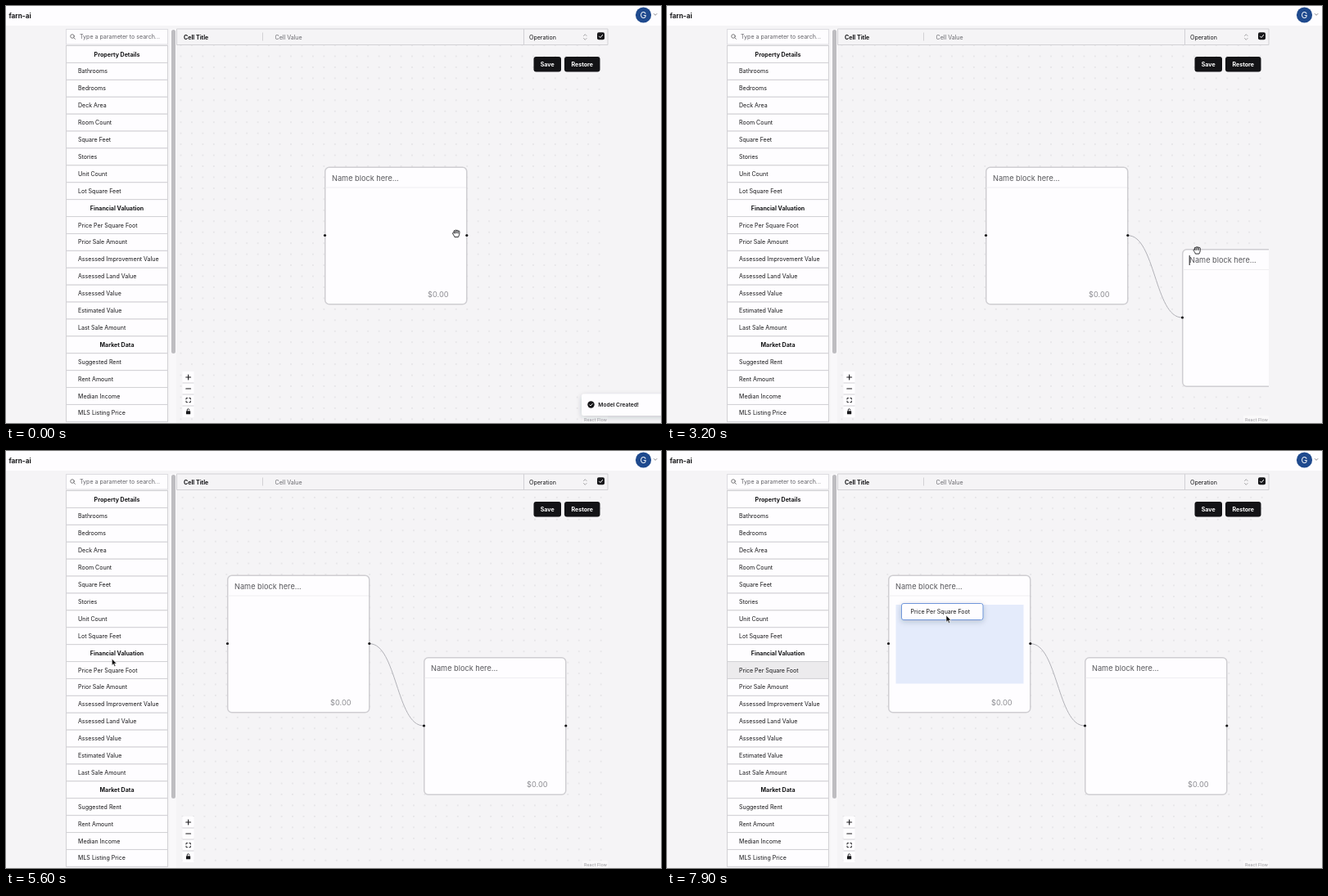
An HTML page for the animation above (8000 ms loop, 800 by 510 pixels).

```html
<!DOCTYPE html>
<html lang="en">
<head>
<meta charset="utf-8">
<title>Block editor</title>
<style>
html, body { margin: 0; width: 100%; height: 100%; overflow: hidden; background: #f5f4f6; }
svg { display: block; }
text { font-family: Inter, "Open Sans", sans-serif; font-size: 7.07px; fill: #161618; white-space: pre; }
.b { font-weight: 700; }
.sheet { fill: #fefdff; }
.line { fill: none; stroke: #d2d1d5; }
.ink { fill: none; stroke: #18181b; stroke-linecap: round; stroke-linejoin: round; }
.edge { fill: none; stroke: #b1b1b7; }
</style>
</head>
<body>
<svg width="800" height="510" viewBox="0 0 800 510">
  <defs>
    <clipPath id="pane"><rect x="208" y="48" width="527" height="462"/></clipPath>
    <pattern id="dots" width="13.45" height="13.45" patternUnits="userSpaceOnUse">
      <circle cx="6.7" cy="6.7" r=".6" fill="#c6c5ca"/>
    </pattern>
    <filter id="soft" x="-20%" y="-40%" width="140%" height="200%">
      <feDropShadow dx="0" dy="2" stdDeviation="3" flood-color="#234" flood-opacity=".22"/>
    </filter>
    <g id="block">
      <rect class="sheet" x=".75" y=".75" width="173" height="167.5" rx="5" stroke="#cfced2" stroke-width="1.5"/>
      <path d="M1.5 25.5H173" stroke="#efeef1"/>
      <text x="9" y="17" style="font-size:9.2px;fill:#58585c">Name block here...</text>
      <text x="151.5" y="159.3" text-anchor="end" style="font-size:9.2px;fill:#8b8b90">$0.00</text>
      <circle cx=".5" cy="84" r="1.6" fill="#161618"/>
      <circle cx="173.8" cy="84" r="1.6" fill="#161618"/>
    </g>
  </defs>

  <g clip-path="url(#pane)">
    <rect id="grid" x="150" y="0" width="800" height="660" fill="url(#dots)"/>
    <g id="world">
      <path id="edge" class="edge"/>
      <use href="#block" x="389" y="196.5"/>
      <rect id="zone" x="398.5" y="233" width="156" height="96.5" fill="#e4ebfb"/>
      <g id="second">
        <use href="#block" x="629" y="297"/>
        <path id="caret" d="M638.2 305v12" stroke="#161618"/>
      </g>
    </g>
    <rect x="704" y="501" width="31" height="9" fill="#fff" opacity=".5"/>
    <text x="706" y="508" style="font-size:5.4px;fill:#98979c">React Flow</text>
  </g>

  <g id="toolbar">
    <path class="line" d="M208.5 28V47.5H735V28ZM632.5 28V47.5" stroke="#dddce0"/>
    <path class="line" d="M313.5 32.5V42.5"/>
    <text class="b" x="217" y="40.5">Cell Title</text>
    <text x="328.5" y="40.5" style="fill:#68686d">Cell Value</text>
    <text x="639" y="40.5">Operation</text>
    <path class="ink" d="M705.5 36.5l1.8-1.8 1.8 1.8M705.5 39.5l1.8 1.8 1.8-1.8" stroke-width=".6" opacity=".6"/>
    <rect x="722" y="32.3" width="9" height="9" rx="2" fill="#18181b"/>
    <path d="M724.2 36.9l1.7 1.7 3-3.5" fill="none" stroke="#fff"/>
    <rect x="644.5" y="62" width="33.5" height="18.5" rx="3" fill="#131316"/>
    <rect x="682" y="62" width="43.5" height="18.5" rx="3" fill="#131316"/>
    <text class="b" x="661.2" y="73.8" text-anchor="middle" style="fill:#fff">Save</text>
    <text class="b" x="703.7" y="73.8" text-anchor="middle" style="fill:#fff">Restore</text>
  </g>

  <g id="controls">
    <rect class="sheet" x="215.5" y="447" width="14" height="56"/>
    <path class="line" d="M215.5 461H229.5M215.5 475H229.5M215.5 489H229.5" stroke="#eeedf0"/>
    <path class="ink" d="M219.8 454h5.8M222.7 451.1v5.8M219.8 468h5.8" stroke-linecap="butt" stroke-width="1.1"/>
    <path class="ink" d="M220 481v-1.5h1.6M223.8 479.5h1.6v1.5M225.4 483.2v1.5h-1.6M221.6 484.7H220v-1.5" stroke-width=".9"/>
    <rect x="220" y="495.3" width="5.2" height="3.9" rx=".5" fill="#18181b"/>
    <path class="ink" d="M221.3 495v-1a1.3 1.3 0 0 1 2.6 0" stroke-width=".9"/>
  </g>

  <g id="sidebar">
    <rect class="sheet" x="73.5" y="28.5" width="124" height="18.5" stroke="#dddce0"/>
    <g class="ink" stroke-width=".8" opacity=".7"><circle cx="81" cy="37" r="2.3"/><path d="M82.8 38.8l1.6 1.6"/></g>
    <text x="90" y="40.3" style="fill:#626267">Type a parameter to search...</text>
    <rect x="200" y="28" width="8" height="482" fill="#f9f8fa"/>
    <rect x="202" y="29" width="5" height="396" rx="2.5" fill="#bebdc1"/>
    <g id="rows"></g>
  </g>

  <g id="topbar">
    <rect class="sheet" width="800" height="24"/>
    <text class="b" x="3.5" y="14.8" style="font-size:8.2px">farn-ai</text>
    <circle cx="778.5" cy="11" r="9.6" fill="#1f4a8e"/>
    <text x="778.5" y="14.9" text-anchor="middle" style="font-size:10.5px;fill:#fff">G</text>
    <path class="ink" d="M791.3 9.5l1.8 1.8 1.8-1.8" stroke-width=".7" opacity=".7"/>
  </g>

  <g id="toast">
    <rect class="sheet" x="703" y="474.5" width="150" height="26.5" rx="3" filter="url(#soft)"/>
    <circle cx="714.5" cy="487.5" r="4.2" fill="#161618"/>
    <path d="M712.6 487.6l1.4 1.4 2.5-2.8" fill="none" stroke="#fff" stroke-width=".9"/>
    <text x="723.3" y="490" style="font-size:6.7px;font-weight:600">Model Created!</text>
  </g>

  <g id="chip">
    <rect class="sheet" x=".5" y=".5" width="99.5" height="20" rx="2.5" stroke="#6f96da" filter="url(#soft)"/>
    <text x="11.5" y="13.1">Price Per Square Foot</text>
  </g>

  <g id="arrow"><path d="M0 0V8.2L1.9 6.5 3.2 9.4 4.6 8.8 3.3 6H5.9Z" fill="#111" stroke="#fff" stroke-width=".6"/></g>
  <g id="hand" class="ink" stroke-width=".9">
    <path d="M-2.2 4.2C-2.6 2.6-4.2 1.4-4.4 0c0-1 1-1 1.6-.2L-3.2-2.4c0-1.1 1.3-1.2 1.6-.2C-1.6-4.3.2-4.4.3-3 .6-4.2 2-4 2.1-2.6 2.5-3.4 3.9-3.2 3.9-2 4 .6 3.6 2.2 2.6 4.2Z" fill="#fff"/>
    <path d="M-1.5-2.4V0M.3-2.9V-.2M2.1-2.4V0"/>
  </g>
  <g id="fist" class="ink" stroke-width=".9">
    <path d="M-1.9 3.6C-2.4 2.4-3.8 1.8-3.8.4-3.9-.6-3-1-2.8-.8-3.1-2.6-1.6-2.9-1.2-2.3-.9-3.3.6-3.2.8-2.3 1.3-3 2.4-2.7 2.5-1.9 4.3-2 3.9.9 2.8 3.6Z" fill="#fff"/>
    <path d="M-2.8-.8V.6M-1.2-2v1M.8-2v1M2.5-1.7v.8"/>
  </g>
</svg>

<script>
const $ = id => document.getElementById(id);
const LOOP = 8000, STEP = 100, PITCH = 20.9;
const HOME = { x: 76.5, y: 257.5 };

// Section titles start with "#".
const labels = ["#Property Details", "Bathrooms", "Bedrooms", "Deck Area", "Room Count", "Square Feet",
  "Stories", "Unit Count", "Lot Square Feet", "#Financial Valuation", "Price Per Square Foot",
  "Prior Sale Amount", "Assessed Improvement Value", "Assessed Land Value", "Assessed Value",
  "Estimated Value", "Last Sale Amount", "#Market Data", "Suggested Rent", "Rent Amount",
  "Median Income", "MLS Listing Price"];
const PRICE = 10;

function add(parent, tag, attrs, text) {
  const el = document.createElementNS("http://www.w3.org/2000/svg", tag);
  for (const k in attrs) el.setAttribute(k, attrs[k]);
  if (text) el.textContent = text;
  parent.append(el);
  return el;
}

const rows = labels.map((label, i) => {
  const y = 59 + i * PITCH, title = label[0] === "#";
  const box = add($("rows"), "rect", { class: "sheet", x: 73.5, y: y - PITCH / 2, width: 124, height: PITCH, stroke: "#d2d1d5" });
  add($("rows"), "text", title
    ? { class: "b", x: 135.5, y: y + 2.5, "text-anchor": "middle" }
    : { x: 88, y: y + 2.5 }, label.replace("#", ""));
  return { box, title };
});

// Pointer path: time, x, y.
const path = [
  [0, 550, 278], [200, 556, 277], [400, 556, 277], [1100, 565, 281], [1400, 565, 281],
  [1500, 575, 282], [1700, 610, 292], [1900, 628, 297], [2400, 628, 297], [2700, 645, 299],
  [2800, 645, 299], [3000, 646, 300], [3100, 646, 300], [3300, 649, 297], [3400, 649, 297],
  [3500, 643, 296], [3700, 595, 285], [3800, 577, 279], [4000, 549, 263], [4200, 530, 252],
  [4300, 530, 252], [4400, 500, 245], [4600, 230, 208], [4800, 135, 205], [4900, 135, 205],
  [5700, 128.5, 261], [5900, 128.5, 261], [6000, 132, 260], [6300, 304, 193], [6500, 310, 194],
  [6800, 250, 238], [7100, 133, 270], [7200, 129, 271], [7300, 129, 271], [7400, 180, 252],
  [7600, 285, 214], [7900, 341, 201]];

function pointer(t) {
  const i = path.findIndex(k => k[0] >= t);
  if (i < 1) return { x: path[0][1], y: path[0][2] };
  const [a, b] = [path[i - 1], path[i]], f = (t - a[0]) / (b[0] - a[0]);
  return { x: a[1] + (b[1] - a[1]) * f, y: a[2] + (b[2] - a[2]) * f };
}

const show = (id, on) => $(id).style.display = on ? "" : "none";
const move = (id, x, y) => $(id).setAttribute("transform", `translate(${x} ${y})`);

function curve(x1, y1, x2, y2) {
  const m = (x1 + x2) / 2;
  return `M${x1} ${y1}C${m} ${y1} ${m} ${y2} ${x2} ${y2}`;
}

// Offset of the dragged chip from its row, or null when nothing is dragged.
function drag(t) {
  const first = t < 7400;
  if (t < 6000 || (first && t > 6800)) return null;
  const p = pointer(first ? Math.min(t, 6600) : t);
  const grab = first ? { x: 128.5, y: 260.5 } : { x: 131.5, y: 272.5 };
  const back = first && t > 6600 ? (1 - (t - 6600) / 250) ** 2 : 1;
  return { x: (p.x - grab.x) * back, y: (p.y - grab.y) * back };
}

function draw(t) {
  const p = pointer(t);

  show("toast", t < 200);
  move("toast", t * 0.6, 0);

  // The canvas trails the pointer by one step.
  const c = pointer(Math.min(Math.max(t - STEP, 3400), 4200));
  const pan = { x: c.x - 649, y: c.y - 297 };
  move("world", pan.x, pan.y);
  $("dots").setAttribute("patternTransform", `translate(${206.8 + pan.x} ${54.8 + pan.y})`);

  const joined = t >= 2200;
  show("edge", t >= 1500);
  $("edge").setAttribute("d", joined ? curve(563, 280.7, 629, 381) : curve(563, 280.7, p.x, p.y));
  show("second", joined);
  show("caret", t < 4500 || (t >= 5000 && t < 5500));

  const d = drag(t);
  show("chip", d);
  if (d) move("chip", HOME.x + d.x, HOME.y + d.y);
  show("zone", d && p.x > 231 && (t < 6600 || t >= 7400));

  const over = t >= 6000 ? PRICE : p.x > 73 && p.x < 198 ? Math.round((p.y - 59) / PITCH) : -1;
  rows.forEach((r, i) => r.box.style.fill = i === over && !r.title ? "#ecebed" : "");

  const kind = t >= 4700 ? "arrow" : t >= 3300 && t <= 4300 ? "fist" : "hand";
  for (const id of ["arrow", "hand", "fist"]) show(id, id === kind);
  move(kind, p.x, p.y);
}

const start = performance.now();
function tick() {
  const t = (performance.now() - start) % LOOP;
  draw(Math.floor(t / STEP) * STEP);
  requestAnimationFrame(tick);
}
tick();
</script>
</body>
</html>
```
